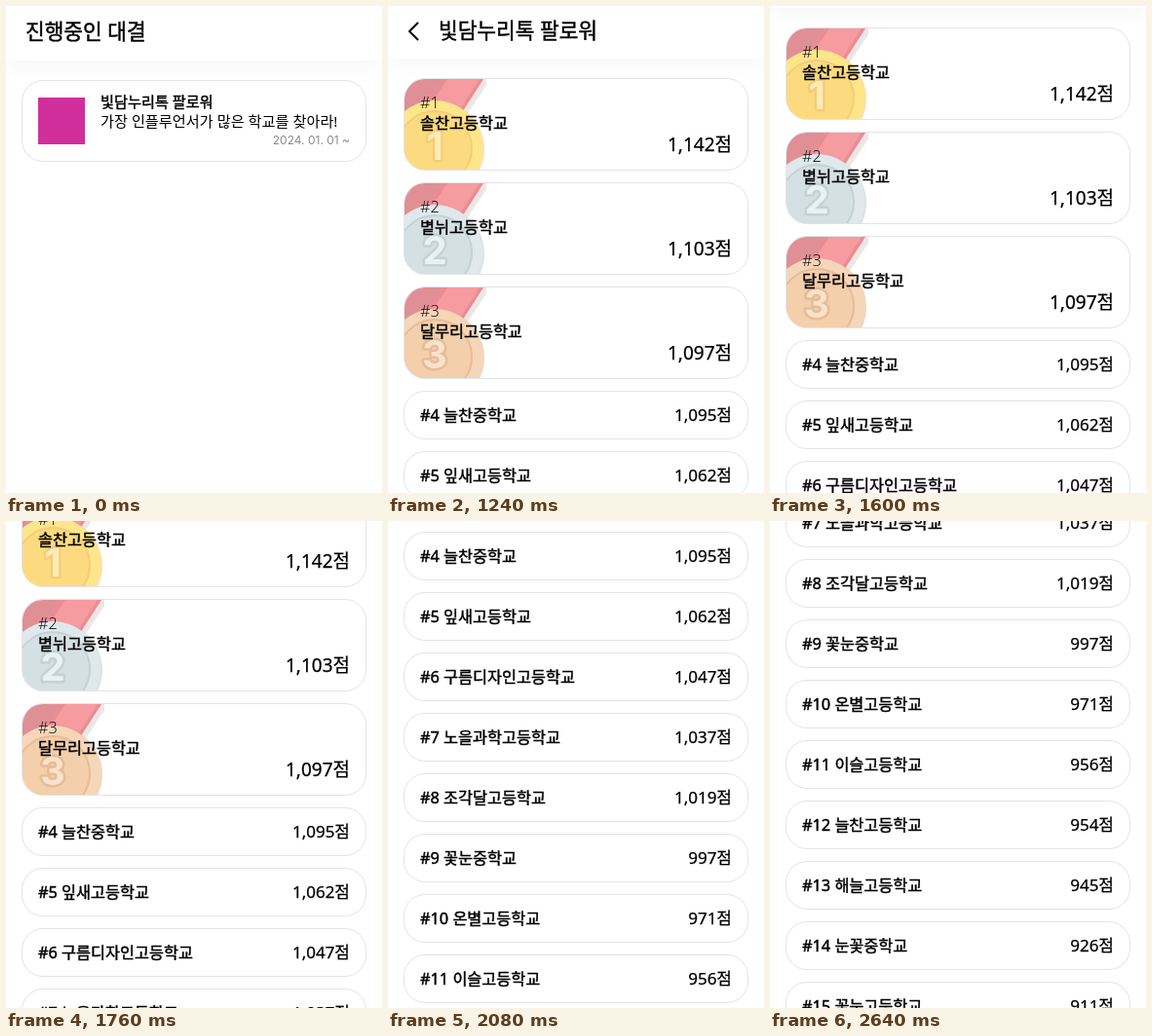
Recreate the animation shown at these times as an HTML page. Size 386 px wide and 500 px high, loop 2.92 s.

```html
<!DOCTYPE html>
<html lang="ko">
<head>
<meta charset="utf-8">
<title>진행중인 대결</title>
<style>
html, body { margin: 0; width: 100%; height: 100%; overflow: hidden; background: #fff; }
body { position: relative; color: #000; font-family: 'Noto Sans', 'Noto Sans CJK KR', sans-serif; }
.screen { position: absolute; left: 0; top: 0; width: 386px; height: 1200px; }
.screen > *, .card > * { position: absolute; box-sizing: border-box; white-space: nowrap; }
header { left: 0; top: 0; width: 386px; height: 55px; background: #fff; box-shadow: 0 6px 20px rgba(0,0,0,.04); }
#home header { height: 56px; }
h1 { margin: 0; top: 11px; font-size: 21.4px; line-height: 30px; }
h1, .topic, .name, .score { font-weight: 400; -webkit-text-stroke: .45px #000; }
#home h1 { left: 20px; }
#rank h1 { left: 52px; }
.back { left: 18px; top: 15px; }
.card { left: 16px; width: 354px; border: 1px solid #e1e4e8; border-radius: 22px; background: #fff; overflow: hidden; }
.card > * { line-height: 24px; }
.icon { left: 16px; top: 17px; width: 48px; height: 48px; background: #d02f9b; }
.topic, .goal { left: 80px; font-size: 15.2px; }
.topic { top: 9px; }
.goal { top: 29px; }
.date { right: 16px; top: 49px; font: 12px/24px Inter, sans-serif; color: #8a8a8a; }
.big { height: 95px; }
.row { height: 50px; }
.place, .name { left: 16px; font-size: 16.3px; }
.place { top: 12px; font-family: 'Open Sans', 'Noto Sans', sans-serif; font-weight: 300; }
.name { top: 33px; }
.row .name { top: 12px; }
.score { right: 16px; top: 12px; font-size: 17px; -webkit-text-stroke-width: .25px; }
.big .score { top: 55px; font-size: 19px; }
.medal { left: 0; top: 0; }
.medal text { font: 700 40px Inter, sans-serif; text-anchor: middle; paint-order: stroke; stroke-width: 5; stroke-linejoin: round; }
</style>
</head>
<body>
<div class="screen" id="home">
  <header></header>
  <h1>진행중인 대결</h1>
  <div class="card" style="top:76px;height:84px">
    <div class="icon"></div>
    <div class="topic">빛담누리톡 팔로워</div>
    <div class="goal">가장 인플루언서가 많은 학교를 찾아라!</div>
    <div class="date">2024. 01. 01 ~</div>
  </div>
</div>
<div class="screen" id="rank">
  <header></header>
  <svg class="back" width="18" height="24"><path d="M13 3 4 12l9 9" fill="none" stroke="#000" stroke-width="2"/></svg>
  <h1>빛담누리톡 팔로워</h1>
</div>
<script>
const LOOP = 2920, STEP = 40, OPEN_AT = 840;
const home = document.getElementById('home');
const rank = document.getElementById('rank');

const schools = [
  ['솔찬고등학교', '1,142'], ['볕뉘고등학교', '1,103'], ['달무리고등학교', '1,097'],
  ['늘찬중학교', '1,095'], ['잎새고등학교', '1,062'], ['구름디자인고등학교', '1,047'],
  ['노을과학고등학교', '1,037'], ['조각달고등학교', '1,019'], ['꽃눈중학교', '997'],
  ['온별고등학교', '971'], ['이슬고등학교', '956'], ['늘찬고등학교', '954'],
  ['해늘고등학교', '945'], ['눈꽃중학교', '926'], ['꽃눈고등학교', '911']
];

// rim, face, ring, digit
const metals = [
  ['#fde68a', '#fcdb80', '#f5cd78', '#fdebb8'],
  ['#dfe8ea', '#d5e0e3', '#c3d2d5', '#eaf1f2'],
  ['#f6d6b8', '#f4cfac', '#e6bc97', '#f9e2cc']
];

function medal(i) {
  const [rim, face, ring, digit] = metals[i];
  return `<svg class="medal" width="84" height="95">
    <path d="M0 0H42L30 40H0Z" fill="#e08f95"/>
    <path d="M84 0 56 42" stroke="#ece6e5" stroke-width="7"/>
    <path d="M38 0H81L54 42 12 40Z" fill="#e98d94"/>
    <path d="M44 0H77L50 42 16 42Z" fill="#f69ba0"/>
    <circle cx="33" cy="72" r="49" fill="${ring}" opacity=".6"/>
    <circle cx="31" cy="71" r="49" fill="${rim}"/>
    <circle cx="31" cy="71" r="38" fill="${face}" stroke="${ring}" stroke-width="2"/>
    <text x="31" y="83" fill="${digit}" stroke="${ring}">${i + 1}</text>
  </svg>`;
}

function card(i) {
  const [name, score] = schools[i];
  const big = i < 3;
  const top = big ? 75 + 107 * i : 396 + 62 * (i - 3);
  const label = big
    ? `${medal(i)}<div class="place">#${i + 1}</div><div class="name">${name}</div>`
    : `<div class="name">#${i + 1} ${name}</div>`;
  return `<div class="card ${big ? 'big' : 'row'}" style="top:${top}px">${label}<div class="score">${score}점</div></div>`;
}
rank.insertAdjacentHTML('beforeend', schools.map((_, i) => card(i)).join(''));

// [time, scroll, speed in px per ms]
const path = [
  [1200, 0, 0], [1440, 24, .14], [1760, 102, .38],
  [2080, 385, .74], [2360, 565, .234], [2640, 605, 0]
];

function scrollAt(t) {
  if (t <= path[0][0]) return 0;
  const i = path.findIndex(p => p[0] >= t);
  if (i < 0) return path[path.length - 1][1];
  const [t0, y0, v0] = path[i - 1], [t1, y1, v1] = path[i];
  const d = t1 - t0, u = (t - t0) / d, w = 1 - u;
  return w * w * (1 + 2 * u) * y0 + u * u * (3 - 2 * u) * y1 + d * u * w * (w * v0 - u * v1);
}

function draw(now) {
  const t = Math.floor(now % LOOP / STEP) * STEP;
  const open = t >= OPEN_AT;
  home.style.display = open ? 'none' : 'block';
  rank.style.display = open ? 'block' : 'none';
  rank.style.top = -Math.round(scrollAt(t)) + 'px';
}

const start = performance.now();
function tick() {
  draw(performance.now() - start);
  requestAnimationFrame(tick);
}
tick();
</script>
</body>
</html>
```
